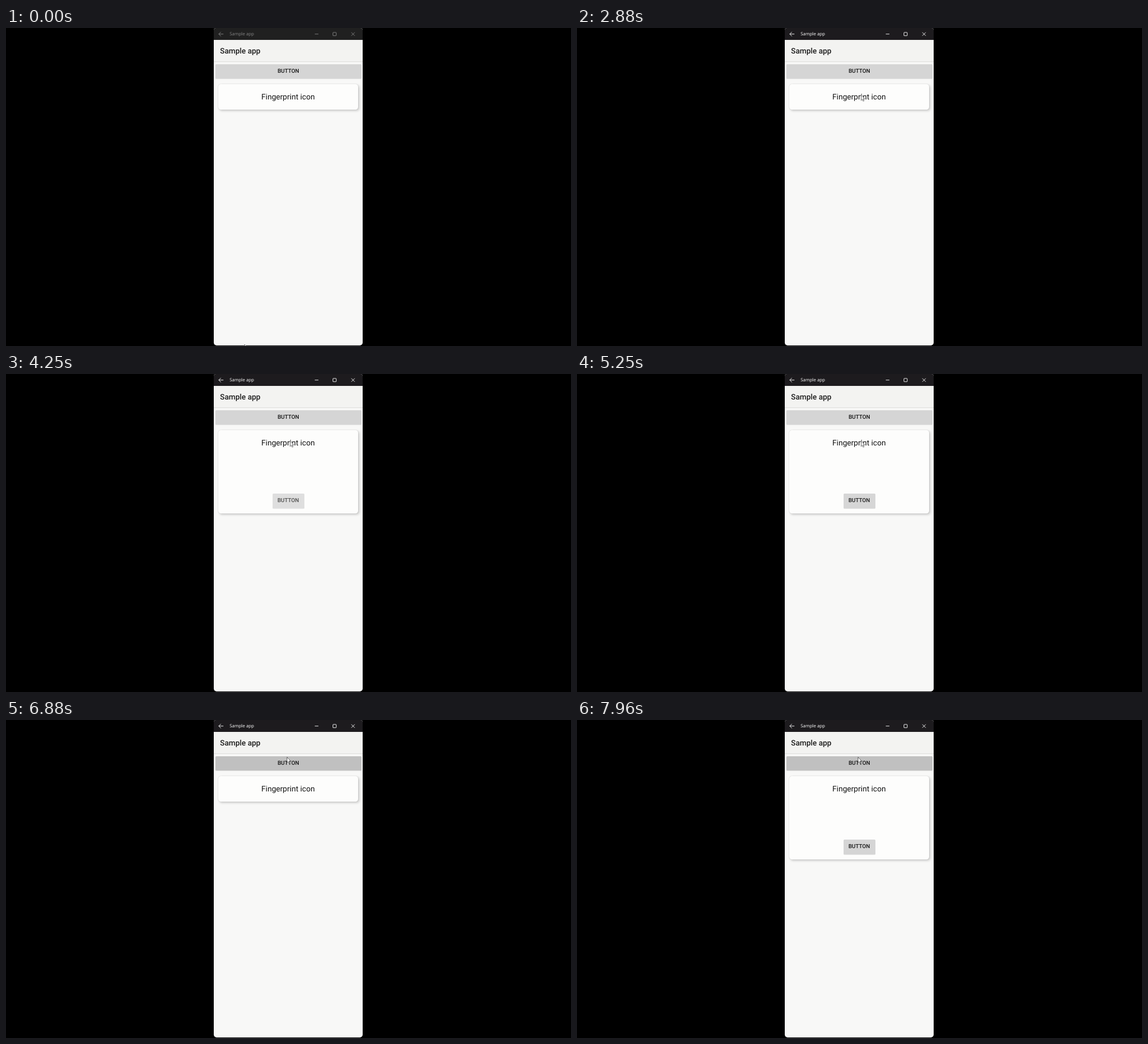
These frames come from a looping animation (998x561 px, 8 s). An HTML page:

```html
<!DOCTYPE html>
<html lang="en">
<head>
<meta charset="utf-8">
<title>Sample app</title>
<style>
html, body { margin: 0; width: 100%; height: 100%; overflow: hidden; background: #000; }
.stage { position: relative; width: 998px; height: 561px; overflow: hidden; background: #000; font-family: Roboto, sans-serif; text-rendering: geometricPrecision; }
.stage * { position: absolute; box-sizing: border-box; }
.stage *, .cursor { animation-duration: 8s; animation-iteration-count: infinite; animation-timing-function: linear; }

.window { left: 367px; top: 0; width: 262.6px; height: 560.2px; border-radius: 4px 4px 5px 5px; background: #f8f8f7; overflow: hidden; }
.titlebar { left: 0; top: 0; width: 100%; height: 21px; background: #1d1b1e; color: #fff; animation-name: focus; }
.titlebar svg { left: 0; top: 0; fill: none; stroke: currentColor; stroke-width: .9; }
.titlebar span { left: 28px; top: 5px; font: 7.85px/12px "Open Sans", "Noto Sans", sans-serif; white-space: nowrap; }
.appbar { left: 0; top: 21px; width: 100%; height: 39px; background: #f3f3f1; border-bottom: 1px solid #dededb; }
.appbar span { left: 11px; top: 10px; font-size: 13.5px; font-weight: 500; line-height: 20px; color: #1c1c1c; white-space: nowrap; }

.button { background: #d5d5d5; border-radius: 1.5px; color: #151515; font-size: 9.8px; font-weight: 500; text-align: center; overflow: hidden; box-shadow: 0 .5px 1px #0003; }
.button span { inset: 0; line-height: 26px; }
.toggle { left: 2.5px; top: 63.5px; width: 258.5px; height: 25.5px; animation-name: hover; }
.ripple { left: -146px; top: -265px; width: 544px; height: 544px; border-radius: 50%; background: #000; opacity: 0; animation-name: ripple; }

.card { left: 7.5px; top: 99px; width: 247.5px; height: 44.5px; border-radius: 4.5px; background: #fdfdfc; box-shadow: 2px 2px 4px #0003, 0 0 1.5px #0003; animation-name: expand; }
.card p { left: 0; top: 13px; width: 100%; margin: 0; font-size: 13.6px; line-height: 20px; text-align: center; color: #111; }
.inner { left: 96px; top: 111.5px; width: 56px; height: 26px; opacity: 0; animation-name: reveal; }

.cursor { left: 0; top: 0; width: 9px; height: 14px; overflow: visible; fill: #fff; stroke: #555; stroke-width: .9; stroke-linejoin: round; animation-name: travel; }

@keyframes focus {
  0%, 12.5% { color: #858585; background: #202020; }
  12.51%, 100% { color: #fff; background: #1d1b1e; }
}
@keyframes expand {
  0%, 46.55% { height: 44.5px; animation-timing-function: cubic-bezier(.37, 0, .63, 1); }
  50.3%, 69.25% { height: 147px; animation-timing-function: cubic-bezier(.37, 0, .63, 1); }
  73%, 91.675% { height: 44.5px; animation-timing-function: cubic-bezier(.37, 0, .63, 1); }
  95.425%, 100% { height: 147px; }
}
@keyframes reveal {
  0%, 50.3% { opacity: 0; }
  54.05%, 65.5% { opacity: 1; }
  69.25%, 95.425% { opacity: 0; }
  99.175%, 100% { opacity: 1; }
}
@keyframes hover {
  0%, 79% { background: #d5d5d5; }
  80%, 100% { background: #c0c0c0; }
}
@keyframes ripple {
  0%, 90.4% { transform: scale(0); opacity: 0; }
  90.5% { transform: scale(.1); opacity: .235; animation-timing-function: ease-out; }
  92.8%, 94.4% { transform: scale(1); opacity: .235; }
  98%, 100% { transform: scale(1); opacity: 0; }
}
@keyframes travel {
  0%, 14% { transform: translate(421px, 558px); animation-timing-function: cubic-bezier(.5, 0, .8, .7); }
  20.375% { transform: translate(462px, 408px); animation-timing-function: cubic-bezier(.2, .45, .5, 1); }
  29%, 74% { transform: translate(501.5px, 117.5px); animation-timing-function: ease-in-out; }
  83%, 100% { transform: translate(496px, 65px); }
}
</style>
</head>
<body>
<div class="stage">
  <div class="window">
    <div class="titlebar">
      <svg width="263" height="21">
        <path d="M17 10.7H8.8M12.6 6.9L8.8 10.7L12.6 14.5M178.5 10.7H184.8M243 7.7L249 13.7M249 7.7L243 13.7"/>
        <rect x="210.5" y="7.8" width="5.8" height="5.8" rx=".6"/>
      </svg>
      <span>Sample app</span>
    </div>
    <div class="appbar"><span>Sample app</span></div>
    <div class="button toggle"><div class="ripple"></div><span>BUTTON</span></div>
    <div class="card">
      <p>Fingerprint icon</p>
      <div class="button inner"><span>BUTTON</span></div>
    </div>
  </div>
  <svg class="cursor"><path d="M.4.4V10.2L2.5 8.3L4 11.6L5.5 10.9L4 7.7H6.9Z"/></svg>
</div>
</body>
</html>
```
